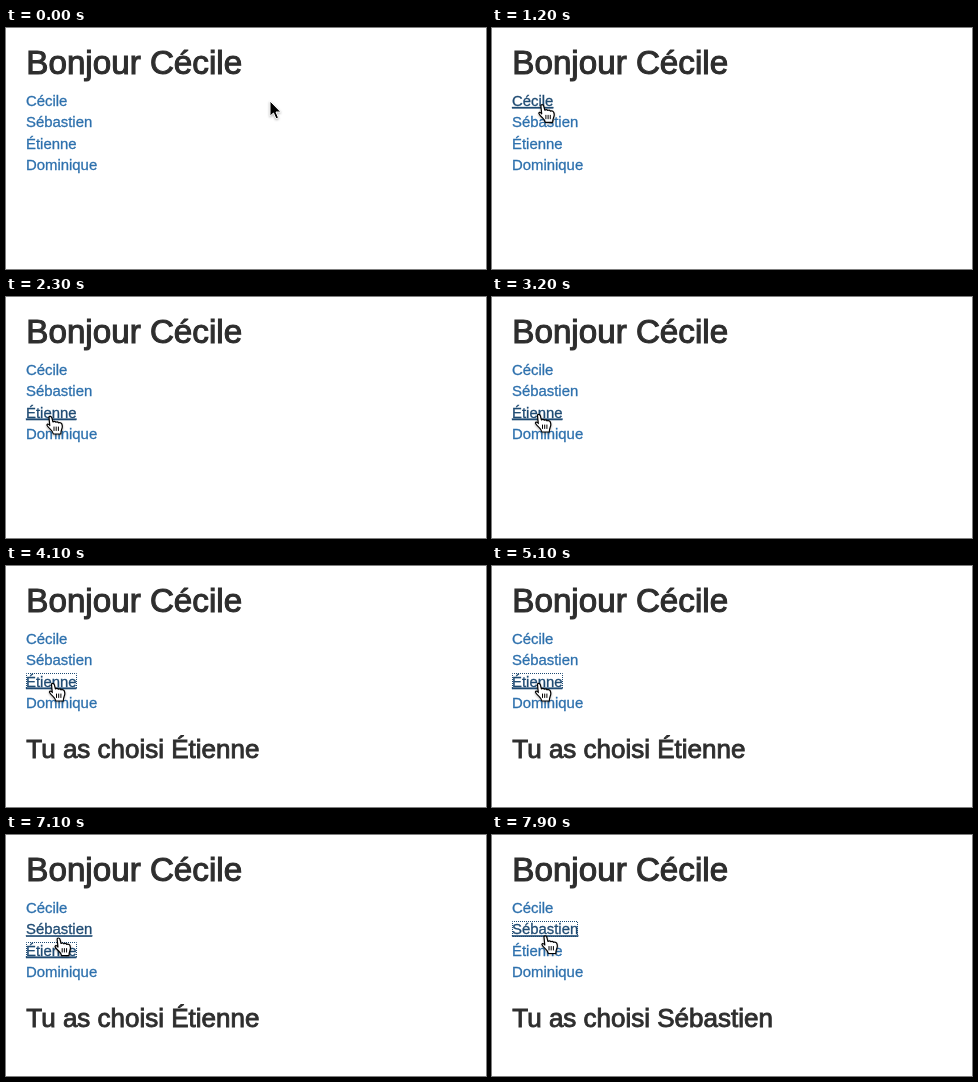
An HTML page that plays this animation: 480x241 px, repeating every 8000 ms.

```html
<!DOCTYPE html>
<html lang="fr">
<meta charset="utf-8">
<style>
html, body { margin: 0; width: 100%; height: 100%; overflow: hidden; background: #fff; }
svg { display: block; width: 480px; height: 241px; font-family: "Liberation Sans", Arial, sans-serif; }
.title { fill: #2e2e2e; stroke: #2e2e2e; stroke-width: 1.1px; }
.link { font-size: 14.9px; fill: #2d70ad; stroke: #2d70ad; stroke-width: .3px; }
.link.hover, .link.focus {
  fill: #1f4b73; stroke: #1f4b73;
  text-decoration: underline 1px; text-underline-offset: 1px;
}
#ring { fill: none; stroke: #1f4b73; stroke-dasharray: 1 1; stroke-dashoffset: .5; }
#arrow, #hand { filter: drop-shadow(0 1px 1px rgba(0,0,0,.3)); }
</style>
<svg viewBox="0 0 480 241">
  <text class="title" x="20.3" y="46" font-size="33.2">Bonjour Cécile</text>
  <g id="links"></g>
  <rect id="ring" height="15"/>
  <text id="choice" class="title" x="20.3" y="192" font-size="26" style="stroke-width:.9px"></text>
  <path id="arrow" d="M0 0V15.2L3.5 12 6 17.8 8.5 16.8 6 11H10.8Z" stroke="#fff" stroke-width="1"/>
  <g id="hand" stroke="#000" stroke-linejoin="round">
    <path fill="#fff" stroke-width="1.2" d="M-1.2 9.5L-2 1.8Q-2.1 .4-.8 .4 .4 .4 .8 1.7L1.9 5.9Q3.7 4.8 4.8 6.2 6.6 5.3 7.6 6.8 9.8 6.1 10.8 7.9 11.9 10.5 10.7 13.2 9.9 15.2 9.8 18H2.4Q2 15.8-.5 13.4-3.4 10.9-4.1 9.1-3.8 7.4-2 8.5Z"/>
    <path fill="none" stroke-width="1" d="M3 10.6V14.9M5.2 10.6V14.9M7.4 10.6V14.9"/>
  </g>
</svg>
<script>
const $ = id => document.getElementById(id);
const LOOP = 8000, STEP = 100, LEFT = 20, FIRST = 78, PITCH = 21.3;
const names = ["Cécile", "Sébastien", "Étienne", "Dominique"];
const links = names.map((name, i) => {
  const el = document.createElementNS("http://www.w3.org/2000/svg", "text");
  el.setAttribute("x", LEFT);
  el.setAttribute("y", FIRST + i * PITCH);
  el.textContent = name;
  el.classList.add("link");
  return $("links").appendChild(el);
});
const widths = links.map(el => el.getComputedTextLength());

// pointer stops: time, x, y
const stops = [
  [0, 264, 73], [1000, 51, 74], [1100, 51, 74], [1600, 50, 96], [2000, 47, 112],
  [2300, 45, 119], [2600, 48, 136], [2800, 48, 136], [3200, 47.5, 117],
  [6400, 47.5, 117], [7300, 54, 100.5], [LOOP, 54, 100.5]
];
// clicks: time, chosen link
const clicks = [[3800, 2], [7500, 1]];

function pointer(t) {
  const i = stops.findIndex(s => s[0] > t);
  const [t0, x0, y0] = stops[i - 1], [t1, x1, y1] = stops[i];
  const p = (t - t0) / (t1 - t0), e = p * p * (3 - 2 * p);
  return [x0 + (x1 - x0) * e, y0 + (y1 - y0) * e];
}

function draw(t) {
  const [x, y] = pointer(t);
  const row = Math.floor((y - 62.5) / PITCH);
  const over = x >= LEFT && x <= LEFT + widths[row] ? row : -1;
  const chosen = clicks.reduce((last, [at, i]) => t >= at ? i : last, -1);

  links.forEach((el, i) => {
    el.classList.toggle("hover", i === over);
    el.classList.toggle("focus", i === chosen);
  });
  $("choice").textContent = chosen < 0 ? "" : "Tu as choisi " + names[chosen];
  $("ring").style.display = chosen < 0 ? "none" : "";
  if (chosen >= 0) {
    $("ring").setAttribute("x", LEFT + .5);
    $("ring").setAttribute("y", Math.round(FIRST + chosen * PITCH - 13.4) + .5);
    $("ring").setAttribute("width", Math.round(widths[chosen]) - 1);
  }
  for (const [id, on] of [["hand", over >= 0], ["arrow", over < 0]]) {
    $(id).style.display = on ? "" : "none";
    $(id).setAttribute("transform", `translate(${x} ${y})`);
  }
}

const start = performance.now();
function tick() {
  const t = (performance.now() - start) % LOOP;
  draw(Math.floor(t / STEP) * STEP);
  requestAnimationFrame(tick);
}
tick();
</script>
</html>
```
